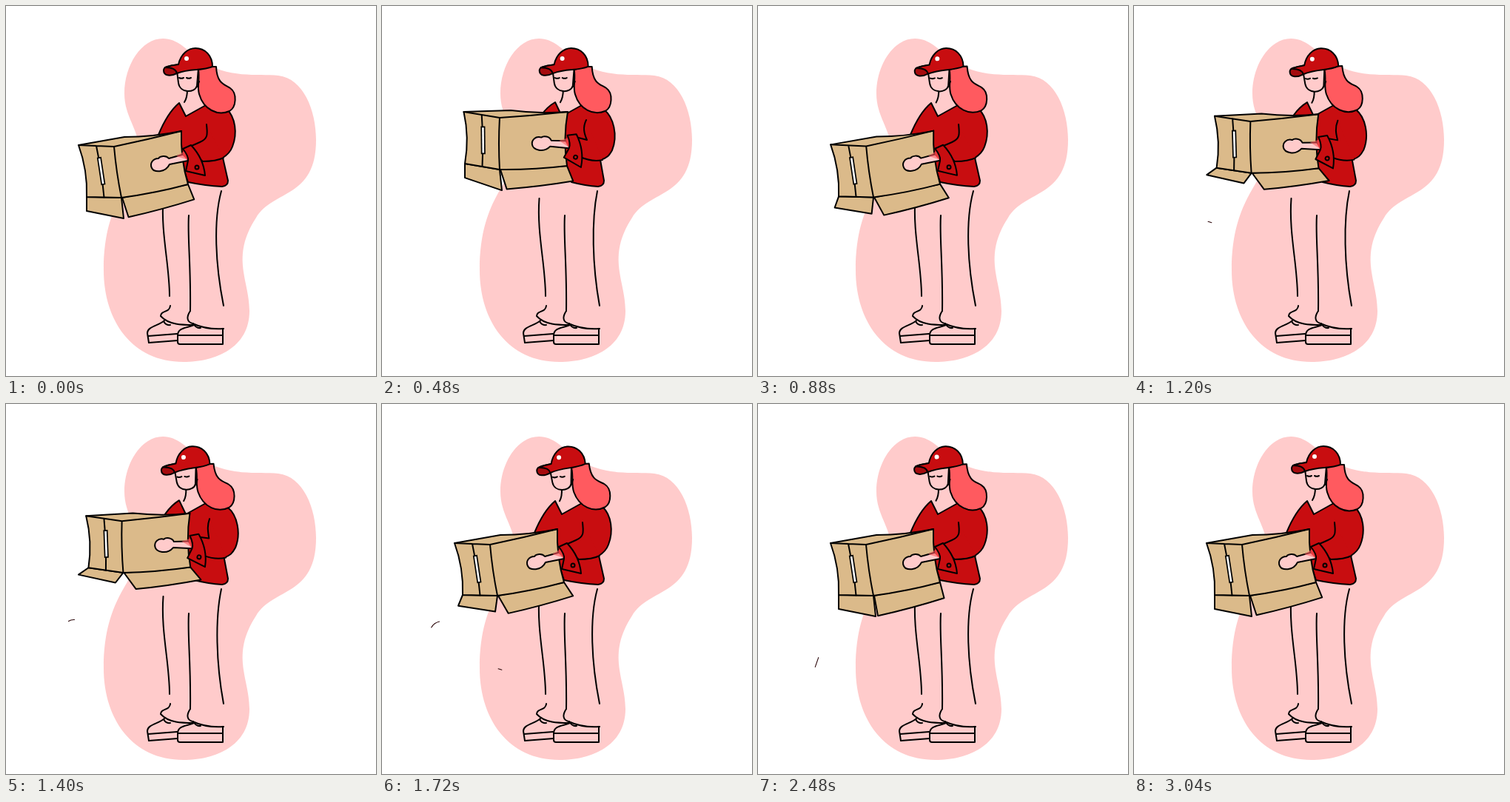
An HTML page for the animation above (3080 ms loop, 500 px wide and 500 px high).

```html
<!DOCTYPE html>
<html lang="en">
<head>
<meta charset="utf-8">
<title>Carrying a box</title>
<style>
html, body { margin: 0; width: 100%; height: 100%; overflow: hidden; background: #fff; }
svg { display: block; width: 100vw; height: 100vh; }
path, circle { fill: none; stroke: #000; stroke-width: 2; stroke-linecap: round; stroke-linejoin: round; }
.red { fill: #c80d10; }
.dark { fill: #a50b0e; }
.skin { fill: #ffcbcb; }
.hair { fill: #ff5a5f; }
.card { fill: #dbba8a; }
.plain { stroke: none; }
.mark { fill: #fff; stroke: none; }
.thin { stroke-width: 1.1; stroke: #2a0508; }
.slot { stroke-width: 6; stroke-linecap: butt; }
.gap { stroke-width: 2.6; stroke: #fff; stroke-linecap: butt; }
</style>
</head>
<body>
<svg viewBox="0 0 500 500">
  <path class="skin plain" d="M212 44C232 44 244 59 262 73C300 99 340 91 368 94C402 98 419 141 419 181C419 260 361 248 338 286C303 340 329 370 329 412C329 462 283 481 240 481C170 481 132 425 132 357C132 255 181 238 180 195C179 165 160 150 160 118C160 80 183 44 212 44Z"/>
  <path d="M212.500 260C209 307 221 350 221 392M247 283C245 310 250 350 249 412"/>
  <path d="M222 405C221 415 209 411 209 419C220 431 238 431 253 431"/>
  <path d="M249 412C243 421 245 427 252 429C265 435 280 437 294 436"/>
  <path d="M214 425C207 432 191 433 191 442L193 455L232 452M192 446L231 443M213 426Q216 432 222 431"/>
  <path d="M254 431C246 435 232 434 232 445L232 454Q232 457 235 457L293 457L293 436M232 445L293 445M253 429Q257 436 263 435"/>
  <path id="leg"/>
  <path id="jacket" class="red"/>
  <path id="side" class="card"/>
  <path id="front" class="card"/>
  <path id="box" class="card"/>
  <path id="edges"/>
  <path id="slot" class="slot"/>
  <path id="gap" class="gap"/>
  <path id="sleeve" class="red"/>
  <g id="forearm">
    <path class="skin" d="M238 201L220 206C216 201 208 203 206 206C198 206 194 213 197 219C200 225 215 226 221 214L246 209"/>
    <path class="hair plain" fill-opacity=".6" d="M230 203L241 196L246 208Z"/>
    <path class="red" d="M239 193Q247 203 246 209L243 223L269 229Q267 206 250 188Z"/>
    <circle cx="258" cy="218" r="2.5"/>
  </g>
  <g id="head">
    <path d="M245 113C245 121 243 127 241 130"/>
    <path class="skin" d="M231 88L233 104C235 118 255 118 258 108L260 84"/>
    <path class="hair" d="M276 82L284 82C285 106 296 106 303 111C313 118 311 137 302 142C286 149 267 140 261 119C258 108 262 100 260 86Z"/>
    <path d="M234 97Q237 98.500 240 97M244 97Q247 98.500 250 97M258 109L261 102"/>
    <path class="dark" d="M233 79C222 81 213 81 213 87C213 95 223 95 231 91L232 84Z"/>
    <path class="red" d="M233 79C236 65 246 57 256 57C269 57 279 67 279 82C264 88 250 84 231 91C230 86 225 83 215 83Q223 80 233 79Z"/>
    <circle class="mark" cx="244" cy="71" r="3"/>
  </g>
  <path id="bit0" class="thin"/>
  <path id="bit1" class="thin"/>
</svg>
<script>
const LOOP = 3080, STEP = 40;
const $ = id => document.getElementById(id);
const set = (id, d) => $(id).setAttribute('d', d);
const lerp = (a, b, k) => a + (b - a) * k;
const between = (p, q, k) => [lerp(p[0], q[0], k), lerp(p[1], q[1], k)];
const shift = (p, dx, dy) => [p[0] + dx, p[1] + dy];
const polar = (p, r, deg) => shift(p, r * Math.cos(deg * Math.PI / 180), r * Math.sin(deg * Math.PI / 180));

// Rises from 0 to 1 and back; a warp above 1 delays the peak.
function hump(t, from, to, warp = 1) {
  const p = Math.max(0, Math.min(1, (t - from) / (to - from)));
  return Math.sin(Math.PI * p ** warp) ** 2;
}

// Blend two path strings that share the same commands.
function mix(a, b, k) {
  const nums = b.match(/-?[\d.]+/g);
  let i = 0;
  return a.replace(/-?[\d.]+/g, n => lerp(+n, +nums[i++], k).toFixed(2));
}

// Curve from p to q, bowed sideways.
function bow(p, q, bend) {
  const dx = q[0] - p[0], dy = q[1] - p[1], len = Math.hypot(dx, dy);
  const [mx, my] = between(p, q, .5);
  return `Q${mx + dy / len * bend} ${my - dx / len * bend} ${q}`;
}

const CLOTHES = {
  leg: ['M291 250C280 290 283 350 294 405', 'M291 250C283 290 284 350 294 405'],
  jacket: [
    'M234 131L243 149L270 134L298 139C310 150 313 172 306 190C303 198 298 202 293 205L300 236Q300 243 292 244Q270 243 246 238L230 190L206 174C213 157 222 141 234 131Z',
    'M234 130L243 149L270 134L300 140C313 150 319 175 311 195C307 202 304 206 295 208L300 236Q300 243 292 244Q275 243 256 238L230 190L205 168C208 155 220 138 234 130Z'],
  sleeve: [
    'M271 160C272 172 274 179 262 184L244 192L266 210Q284 210 294 205',
    'M276 154C271 164 273 172 277 181L258 176L268 204Q284 211 298 208']
};

// Box corners: left, middle, right, back, then the fold from left to right.
const LOW = [[98, 188], [146, 190], [237, 169], [160, 177], [109, 258], [156, 259], [246, 241]];
const HIGH = [[110.5, 143], [159, 151], [251, 143], [174, 141], [112, 213], [159, 221], [250, 216]];

function drawBox(t, lift) {
  const [left, mid, right, back, e, f, g] = LOW.map((p, i) => between(p, HIGH[i], lift));
  set('box', `M${left}L${back}${bow(back, right, -4)}${bow(right, g, -6)}${bow(g, f, 3)}L${e}${bow(e, left, -7)}Z`);

  const top = between(left, mid, .5), low = between(e, f, .5);
  set('edges', `M${left}L${mid}${bow(mid, right, -1)}M${mid}${bow(mid, f, -2)}M${top}${bow(top, low, 2)}`);
  const slit = (a, b) => `M${shift(between(top, low, a), 1.5, 0)}L${shift(between(top, low, b), 1.5, 0)}`;
  set('slot', slit(.22, .76));
  set('gap', slit(.245, .735));

  const open = hump(t, 560, 2060);
  const outer = shift(e, -14 * open, lerp(19, 9, open));
  const inner = shift(f, lerp(3, -11, open), lerp(28, 13, open));
  set('side', `M${e}L${f}L${inner}L${outer}Z`);

  const angle = 70 - 18 * Math.min(1, 1.5 * open) + 8 * hump(t, 2080, 3040);
  const a = polar(f, 28, angle), b = polar(g, 22, angle - 2);
  set('front', `M${shift(f, 1, 0)}L${g}L${b}${bow(b, a, 2)}Z`);
}

// A short stroke that sways, turns and falls.
function drawBit(id, age, life, x0, y0) {
  const on = age >= 0 && age < life;
  $(id).style.display = on ? '' : 'none';
  if (!on) return;
  const p = age / 1280, sway = Math.sin(Math.PI * p);
  const c = [x0 - 23 * p - 22 * sway, y0 + 57 * p ** 2.5];
  const half = 2.5 + 4.3 * Math.min(1, 2.4 * p), turn = 16 - 87 * p ** .57;
  const a = polar(c, -half, turn), b = polar(c, half, turn);
  set(id, `M${a}${bow(a, b, 3 * sway)}`);
}

function draw(t) {
  const lift = 1.18 * hump(t, 0, 900, 1.575) + hump(t, 900, 1680);
  for (const id in CLOTHES) set(id, mix(...CLOTHES[id], lift));
  drawBox(t, lift);
  $('forearm').setAttribute('transform', `translate(${6 * lift} ${-14 * lift}) rotate(${17 * lift} 256 210)`);
  $('head').setAttribute('transform', `rotate(${-3.8 * hump(t, 0, LOOP, 1.3)} 260 146)`);
  drawBit('bit0', t - 1200, 1400, 102.5, 292);
  drawBit('bit1', t - 1720, 300, 159.5, 358.5);
}

const start = performance.now();
function tick() {
  const t = (performance.now() - start) % LOOP;
  draw(Math.floor(t / STEP) * STEP);
  requestAnimationFrame(tick);
}
tick();
</script>
</body>
</html>
```
